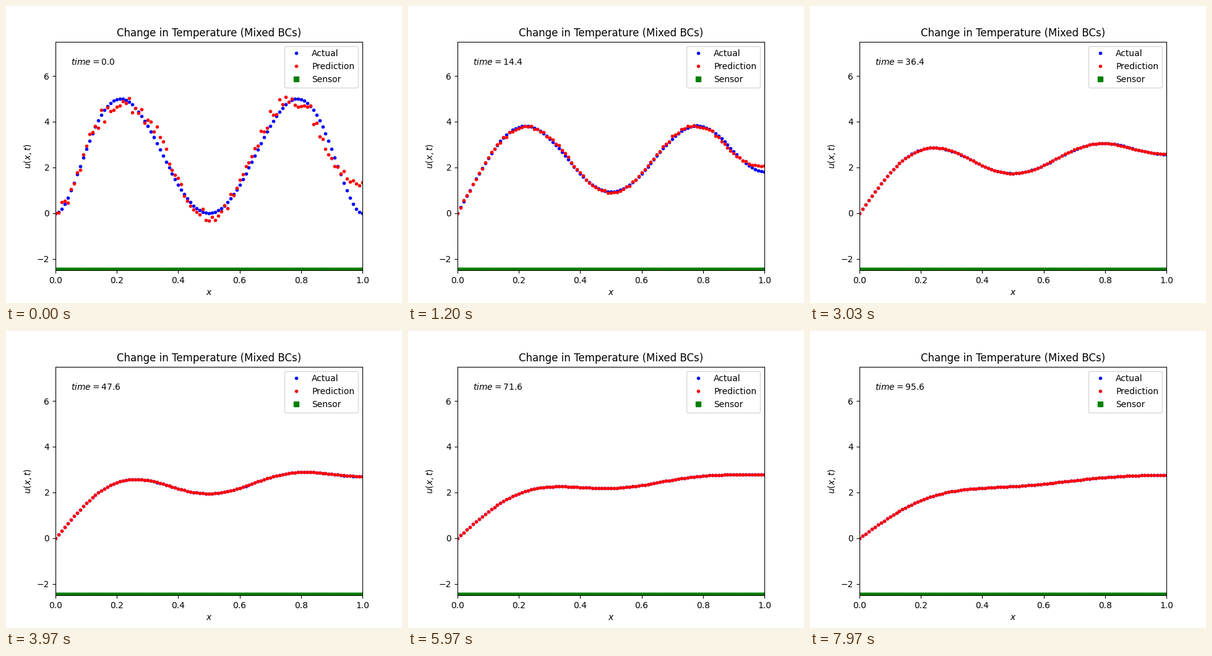
Write a matplotlib script that moves like this. It is 640 px wide and 480 px high and loops after 8000 ms.

```python
import numpy as np
import matplotlib.pyplot as plt
from matplotlib.animation import FuncAnimation

FRAMES = 320
LOOP_MS = 8000
DT = 0.4           # simulated time per step
ALPHA = 3e-4       # diffusivity
GAIN = 0.116       # decay rate of the prediction error
MODES = 80


def initial(x):
    return 2160 * (x * (1 - x) * (x - 0.5)) ** 2


def initial_error(x):
    """Slow drift of the first guess plus sensor noise; exact at x = 0."""
    knots = [0, 0.1, 0.18, 0.26, 0.33, 0.42, 0.5, 0.68, 0.77, 0.86, 0.91, 1]
    drift = [0, 0.1, -0.3, 0, 0.57, 0.05, -0.28, 0.38, 0.1, -0.6, -0.2, 1.35]
    noise = np.random.default_rng(4).normal(0, 0.16, x.size)
    noise[0] = 0
    return np.interp(x, knots, drift) + noise


x = np.linspace(0, 1, 101)
error = initial_error(x)

# Heat equation with u(0) = 0 and u_x(1) = 0 as a sine series
lam = (np.arange(MODES) + 0.5) * np.pi
fine = np.linspace(0, 1, 4001)
coef = 2 * np.sin(np.outer(lam, fine)) @ initial(fine) * (fine[1] - fine[0])
basis = np.sin(np.outer(x, lam))


def temperature(t):
    return basis @ (coef * np.exp(-ALPHA * lam ** 2 * t))


fig, ax = plt.subplots(figsize=(6.4, 4.8), dpi=100)
ax.set(xlim=(0, 1), ylim=(-2.5, 7.5), xlabel="$x$", ylabel="$u(x,t)$",
       title="Change in Temperature (Mixed BCs)")
actual, = ax.plot(x, initial(x), "b.", label="Actual")
predicted, = ax.plot(x, initial(x) + error, "r.", label="Prediction")
ax.plot(x, np.full_like(x, -2.5), "gs", label="Sensor")
ax.legend(loc="upper right")
clock = ax.text(0.05, 0.9, "", transform=ax.transAxes)


def draw(i):
    step = (3 * i + 2) // 4  # three simulation steps per four frames
    t = step * DT
    u = temperature(t)
    actual.set_ydata(u)
    predicted.set_ydata(u + error * np.exp(-GAIN * t))
    clock.set_text(f"$time = {t:.1f}$")
    return actual, predicted, clock


anim = FuncAnimation(fig, draw, frames=FRAMES, interval=LOOP_MS // FRAMES,
                     repeat=True, repeat_delay=0)
plt.show()
```
